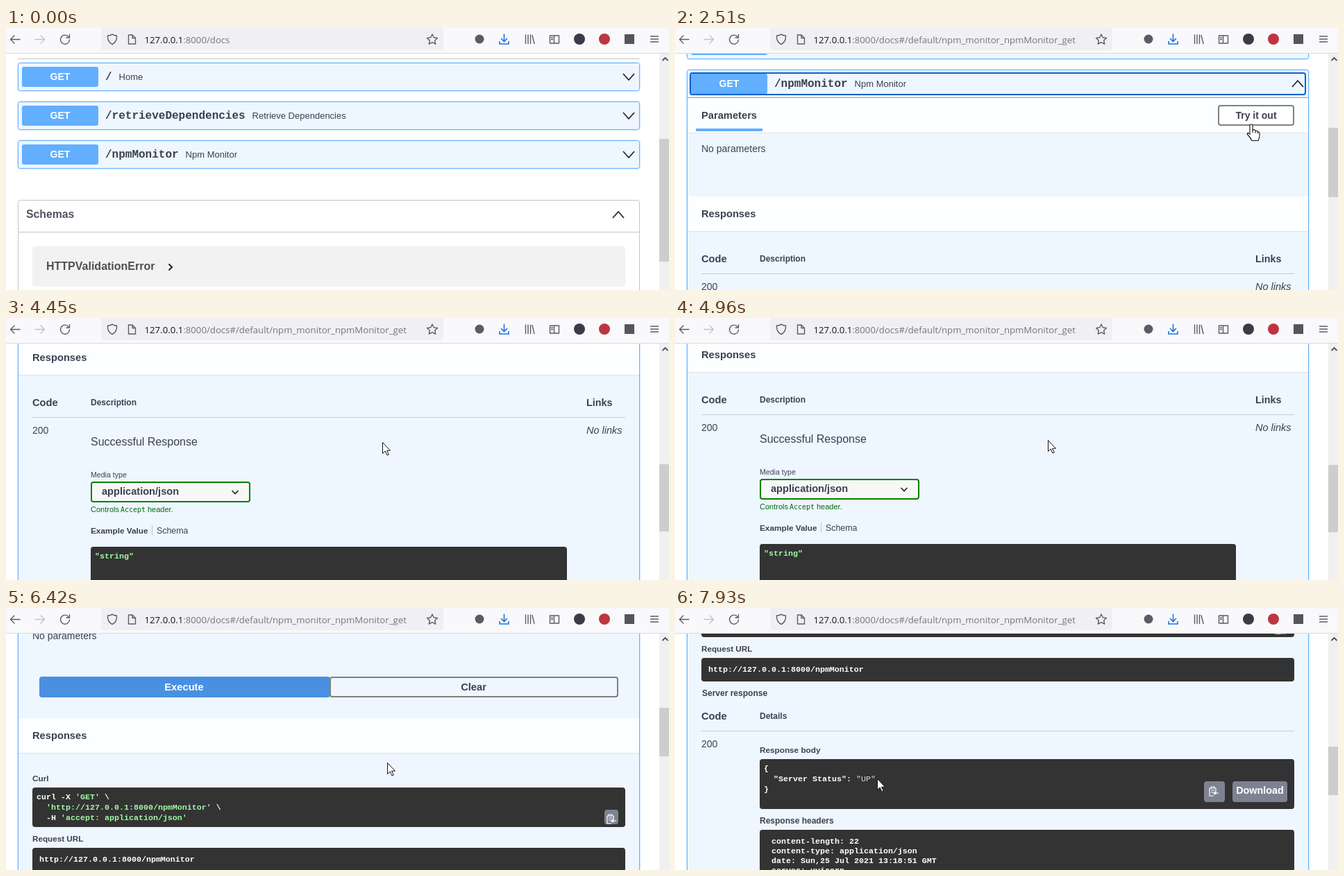
These frames come from a looping animation (955 px wide and 378 px high, 8 s). An HTML page:

```html
<!DOCTYPE html>
<html lang="en">
<head>
<meta charset="utf-8">
<title>API docs</title>
<style>
  html, body { margin: 0; width: 100%; height: 100%; overflow: hidden; background: #fff; }
  svg { display: block; width: 955px; height: 378px; }
  text { font-family: "Liberation Sans", Arial, sans-serif; fill: #3b4151; white-space: pre; }
  .b { font-weight: bold; }
  .mono { font-family: "Liberation Mono", "Courier New", monospace; font-weight: bold; }
  .code { font-family: "Liberation Mono", "Courier New", monospace; font-weight: bold; fill: #fff; }
  .url { font-family: "Open Sans", "Noto Sans", sans-serif; fill: #15141a; }
  .mid { text-anchor: middle; }
  .icon { fill: none; stroke: #5b5b66; stroke-width: 1.4; stroke-linecap: round; stroke-linejoin: round; }
</style>
</head>
<body>
<svg id="stage" viewBox="0 0 955 378"></svg>
<script>
const LOOP = 8000;
const OPEN = 950, TRY = 2600, SUBMIT = 5600, DONE = 5730;
const SCROLL_TIME = 190, PAGE_TOP = 206;
const BLUE = '#61affe', PALE = '#eef6ff', GREEN = '#a2fca2';

// SVG helpers
const text = (x, y, str, size, cls = '', attrs = '') =>
  `<text x="${x}" y="${y}" font-size="${size}" class="${cls}" ${attrs}>${str}</text>`;
const rect = (x, y, w, h, fill, rx = 0, attrs = '') =>
  `<rect x="${x}" y="${y}" width="${w}" height="${h}" fill="${fill}" rx="${rx}" ${attrs}/>`;
const outline = (x, y, w, h, color, width = 2, fill = 'none') =>
  rect(x + width / 2, y + width / 2, w - width, h - width, fill, 3, `stroke="${color}" stroke-width="${width}"`);
const path = (d, color = '#222', width = 1.7, fill = 'none') =>
  `<path d="${d}" stroke="${color}" stroke-width="${width}" fill="${fill}"/>`;
const icon = d => `<path class="icon" d="${d}"/>`;
const group = (id, body, attrs = '') => `<g id="${id}" ${attrs}>${body}</g>`;
const white = 'style="fill:#fff"';
const fill = color => `style="fill:${color}"`;
const code = (x, y, str) => text(x, y, str, 11.67, 'code');
const tint = (str, color = GREEN) => `<tspan fill="${color}">${str}</tspan>`;
const chevron = (x, y, up) => path(`M${x - 8} ${up ? y + 4.5 : y - 4.5}L${x} ${up ? y - 4.5 : y + 4.5}L${x + 8} ${up ? y + 4.5 : y - 4.5}`);

// Page parts
function opBlock(y, route, label, height = 41, open = false) {
  return rect(17.5, y + .5, 895, height - 1, PALE, 4, `stroke="${BLUE}" stroke-opacity=".18" stroke-width="4"`) +
    outline(17, y, 896, height, BLUE, 1, PALE) +
    rect(23, y + 6, 110, 29, BLUE, 3) +
    text(78, y + 25, 'GET', 14, 'b mid', white) +
    text(143, y + 25, route, 16, 'mono') +
    text(153 + 9.6 * route.length, y + 25, label, 13) +
    chevron(897, y + 20.5, open);
}

const band = (y, title) =>
  rect(18, y, 894, 50, '#fdfeff') + rect(18, y + 50, 894, 1, '#dbe3ea') +
  text(38, y + 30, title, 14.7, 'b');

const tableHead = (y, label) =>
  text(38, y, 'Code', 14.7, 'b') + text(122, y - 1, label, 12, 'b') +
  rect(38, y + 16, 854, 1, '#c5ccd4') + text(38, y + 40, '200', 14);

function sampleResponse(shift) {
  return `<g transform="translate(0 ${shift})">` + band(345, 'Responses') +
    tableHead(440, 'Description') +
    text(836, 440, 'Links', 14.3, 'b') + text(836, 480, 'No links', 14.5, '', 'font-style="italic"') +
    text(122, 497, 'Successful Response', 16) + text(122, 543, 'Media type', 10.6) +
    outline(122, 549, 230, 30, '#008000', 2, '#f7f7f7') +
    text(138, 568, 'application/json', 14.6, 'b') + path('M325.500 562L330 566.500L334.500 562') +
    text(122, 593, 'Controls', 11, '', fill('#006b10')) +
    text(165, 593, 'Accept', 10, '', 'style="fill:#006b10;font-family:\'DejaVu Sans Mono\',monospace"') +
    text(204, 593, 'header.', 11, '', fill('#006b10')) +
    text(122, 624, 'Example Value', 11.8, 'b') + rect(210, 612, 1, 15, '#c0c6cc') +
    text(217, 624, 'Schema', 12.4) +
    rect(122, 643, 686, 92, '#333', 4) + code(128, 660, tint('"string"')) + '</g>';
}

const clipboard = (x, y) =>
  path(`M${x + 10} ${y + 12}V${y + 3}H${x + 1}V${y + 14}H${x + 7}M${x + 3} ${y + 3}V${y + 1}H${x + 8}V${y + 3}` +
    `M${x + 3} ${y + 6}H${x + 8}M${x + 3} ${y + 9}H${x + 6}M${x + 14} ${y + 10}H${x + 7}L${x + 9} ${y + 8}M${x + 7} ${y + 10}L${x + 9} ${y + 12}`, '#fff', 1.2);

function liveResponse() {
  const headers = ['content-length: 22', 'content-type: application/json',
    'date: Sun,25 Jul 2021 13:18:51 GMT', 'server: uvicorn'];
  return rect(48, 335, 419, 30, '#4990e2', 4) + outline(466, 335, 416, 30, '#808080') +
    text(256.5, 355, 'Execute', 14.7, 'b mid', white) + text(673.5, 355, 'Clear', 14.7, 'b mid') +
    band(395, 'Responses') +
    text(38, 486, 'Curl', 11.8, 'b') + rect(38, 495, 854, 57, '#333', 4) +
    code(44, 512, `curl -X ${tint("'GET'")} \\`) +
    code(44, 527, `  ${tint("'http://127.0.0.1:8000/npmMonitor'")} \\`) +
    code(44, 542, `  -H ${tint("'accept: application/json'")}`) +
    rect(862, 527, 20, 21, '#7d8293', 4) + clipboard(865, 533) +
    text(38, 573, 'Request URL', 11.7, 'b') + rect(38, 582, 854, 34, '#333', 4) +
    code(48, 602, 'http://127.0.0.1:8000/npmMonitor') +
    text(39, 637, 'Server response', 12, 'b') + tableHead(671, 'Details') +
    text(122, 719, 'Response body', 11.75, 'b') + rect(122, 728, 770, 72, '#333', 4) +
    code(128, 745, '{') + code(128, 760, `  "Server Status": <tspan font-weight="normal" fill="#ddd">"UP"</tspan>`) + code(128, 775, '}') +
    rect(762, 760, 30, 30, '#7d8293', 4) + clipboard(769, 767) +
    rect(803, 760, 79, 30, '#7d8293', 4) + text(842.5, 778, 'Download', 14.4, 'b mid', white) +
    text(122, 821, 'Response headers', 12, 'b') + rect(122, 830, 770, 92, '#333', 4) +
    headers.map((line, i) => code(139, 850 + 14 * i, line)).join('');
}

const schemas = opBlock(162, '/npmMonitor', 'Npm Monitor') +
  outline(17, 248, 896, 200, '#c3c5c9', 1, '#fff') + rect(18, 294, 894, 1, '#c3c5c9') +
  text(29, 274, 'Schemas', 15.8, 'b', fill('#505560')) + chevron(882, 269.5, true) +
  rect(38, 315, 854, 58, '#f2f2f2', 4) +
  text(58, 349, 'HTTPValidationError', 16, 'b', fill('#505050')) + path('M234.500 340.500L239 345L234.500 349.500', '#222', 2);

const openBlock = opBlock(162, '/npmMonitor', 'Npm Monitor', 900, true) +
  rect(18, 202, 894, 1, BLUE) + band(203, 'Parameters') + rect(30, 247, 96, 4, BLUE) +
  text(38, 281, 'No parameters', 14);

const page = rect(17, 44, 896, 1, '#c3c5c9') + opBlock(50, '/', 'Home') +
  opBlock(106, '/retrieveDependencies', 'Retrieve Dependencies') +
  group('closed', schemas) +
  group('opened', openBlock +
    group('idle', outline(782, 213, 110, 30, '#808080', 2, '#fff') +
      text(837, 233, 'Try it out', 14, 'b mid') + sampleResponse(0)) +
    group('focus', outline(21, 166, 888, 33, '#0a62cc')) +
    group('cancel', outline(794, 213, 98, 30, '#f0625a', 2, '#fff') +
      text(843, 233, 'Cancel', 14.4, 'b mid', fill('#f0625a'))) +
    group('ready', rect(38, 325, 854, 36, '#4990e2', 4) +
      text(465.5, 348, 'Execute', 14.7, 'b mid', white) + sampleResponse(36)) +
    group('done', liveResponse()));

const toolbar = rect(0, 0, 955, 37, '#f9f9fb') + rect(0, 36, 955, 1, '#dadadd') +
  rect(137, -6, 493, 38, '#f0f0f4', 4) +
  icon('M20 16.500H7M12 11L6.500 16.500L12 22') +
  '<g opacity=".35">' + icon('M42 16.500H55M50 11L55.500 16.500L50 22') + '</g>' +
  icon('M90 12.500A6.500 6.500 0 1 0 91.500 17M91.500 9.500V14H87') +
  icon('M153 9C151 11 148.500 11 146.500 11C146 17 148 21 153 23.500C158 21 160 17 159.500 11C157.500 11 155 11 153 9Z') +
  icon('M176.500 10H182L186.500 14.500V23H176.500ZM182 10V14.500H186.500') +
  icon('M614 9L616.300 13.700L621.500 14.400L617.700 18L618.700 23.200L614 20.700L609.300 23.200L610.300 18L606.500 14.400L611.700 13.700Z') +
  '<circle cx="682" cy="16" r="6.500" fill="#5b5b66"/>' +
  path('M717.500 8.500V19M713 15L717.500 19.500L722 15M711 19V23H724V19', '#1a73e8', 1.6) +
  icon('M748.500 10V22.500M752 10V22.500M755.500 10V22.500M758 10.500L761 22.500') +
  icon('M783.500 11H796.500V22H783.500ZM789.500 11V22M785.500 14H787.500M785.500 16.500H787.500') +
  '<circle cx="826" cy="16" r="8" fill="#3b3a46"/><circle cx="862" cy="16" r="8" fill="#bd3540"/>' +
  rect(891, 9, 14, 14, '#55555c') +
  icon('M928.500 12H939.500M928.500 16H939.500M928.500 20H939.500') +
  `<text class="url" x="199.500" y="22" font-size="13.200">127.0.0.1<tspan id="route" fill="#74747e"></tspan></text>`;

const scrollbar = rect(941, 37, 14, 341, '#f0f0f0') + path('M945.500 47L949.500 43L953.500 47', '#505050', 1.8) +
  '<rect id="thumb" x="941" width="14" fill="#cdcdcd"/>';

const cursors =
  group('arrow', path('M.5 .5V16.500L4.200 13L7 19L9.300 18L6.500 12.200H11.500Z', '#111', 1, '#fff')) +
  group('hand', path('M0 13V2Q0 0 2 0T4 2V8Q7.500 6.800 8 9.500Q11 8.500 11.300 10.800Q14 10.300 14 13V17Q13.500 20 12 23.500H3Q1 19 -3.500 14.500Q-4.500 11 0 14ZM4 8V12M8 9.500V12.500M11.300 10.800V13.500', '#111', 1.1, '#fff')) +
  group('blocked', '<circle r="7" fill="#fff" stroke="#b5121b" stroke-width="2.600"/>' + path('M-5 -5L5 5', '#b5121b', 2.6));

document.getElementById('stage').innerHTML =
  group('page', page) + scrollbar + toolbar + group('pointer', cursors);
const el = id => document.getElementById(id);
const show = (id, on) => el(id).setAttribute('visibility', on ? 'inherit' : 'hidden');
// Nested groups need display, since visibility can be overridden by children.
const toggle = (id, on) => { el(id).style.display = on ? '' : 'none'; };

// Wheel steps: start time and distance
const wheel = [[1620, 102], [3250, 102], [3740, 102], [4405, 102], [4900, -102],
  [5160, -102], [6388, 102], [6880, 102], [7420, 102]];
// Pointer stops: time, x, y
const stops = [[110, 660, 348], [530, 640, 187], [1000, 640, 187], [1420, 690, 196], [2300, 828, 139],
  [2700, 828, 139], [3140, 745, 166], [3560, 661, 178], [3980, 600, 180], [4450, 542, 179],
  [4850, 542, 179], [5500, 483, 143], [5750, 483, 143], [6420, 549, 223], [6560, 549, 223],
  [7300, 420, 238], [7930, 291, 246]];
const handTimes = [[480, 1420], [2180, 2760], [5380, SUBMIT], [DONE, 5960]];

const scrollAt = t => wheel.reduce((sum, [start, step]) => {
  const p = Math.min(1, Math.max(0, (t - start) / SCROLL_TIME));
  return sum + step * (1 - (1 - p) ** 2);
}, 0);

function pointerAt(t) {
  const i = stops.findIndex(s => s[0] > t);
  if (i < 0) return stops[stops.length - 1].slice(1);
  if (i === 0) return stops[0].slice(1);
  const [t0, x0, y0] = stops[i - 1], [t1, x1, y1] = stops[i];
  const p = (t - t0) / (t1 - t0), e = p * p * (3 - 2 * p);
  return [x0 + (x1 - x0) * e, y0 + (y1 - y0) * e];
}

function draw(t) {
  const scroll = scrollAt(t);
  el('page').setAttribute('transform', `translate(0 ${-Math.round(scroll)})`);
  toggle('closed', t < OPEN);
  toggle('opened', t >= OPEN);
  toggle('idle', t < TRY);
  toggle('focus', t < TRY);
  toggle('cancel', t >= TRY);
  toggle('ready', t >= TRY && t < DONE);
  toggle('done', t >= DONE);
  el('route').textContent = ':8000/docs' + (t < OPEN ? '' : '#/default/npm_monitor_npmMonitor_get');

  const [ratio, length] = t < OPEN ? [.515, 177] : t < TRY ? [.292, 100] : t < DONE ? [.283, 97] : [.2035, 70];
  el('thumb').setAttribute('y', Math.round(54 + (PAGE_TOP + scroll) * ratio));
  el('thumb').setAttribute('height', length);

  const [x, y] = pointerAt(t);
  const blocked = t >= SUBMIT && t < DONE;
  const hand = handTimes.some(([from, to]) => t >= from && t < to);
  el('pointer').setAttribute('transform', `translate(${Math.round(x)} ${Math.round(y)})`);
  show('pointer', t >= 110);
  toggle('blocked', blocked);
  toggle('hand', hand);
  toggle('arrow', !hand && !blocked);
}

function tick() {
  draw(performance.now() % LOOP);
  requestAnimationFrame(tick);
}
tick();
</script>
</body>
</html>
```
